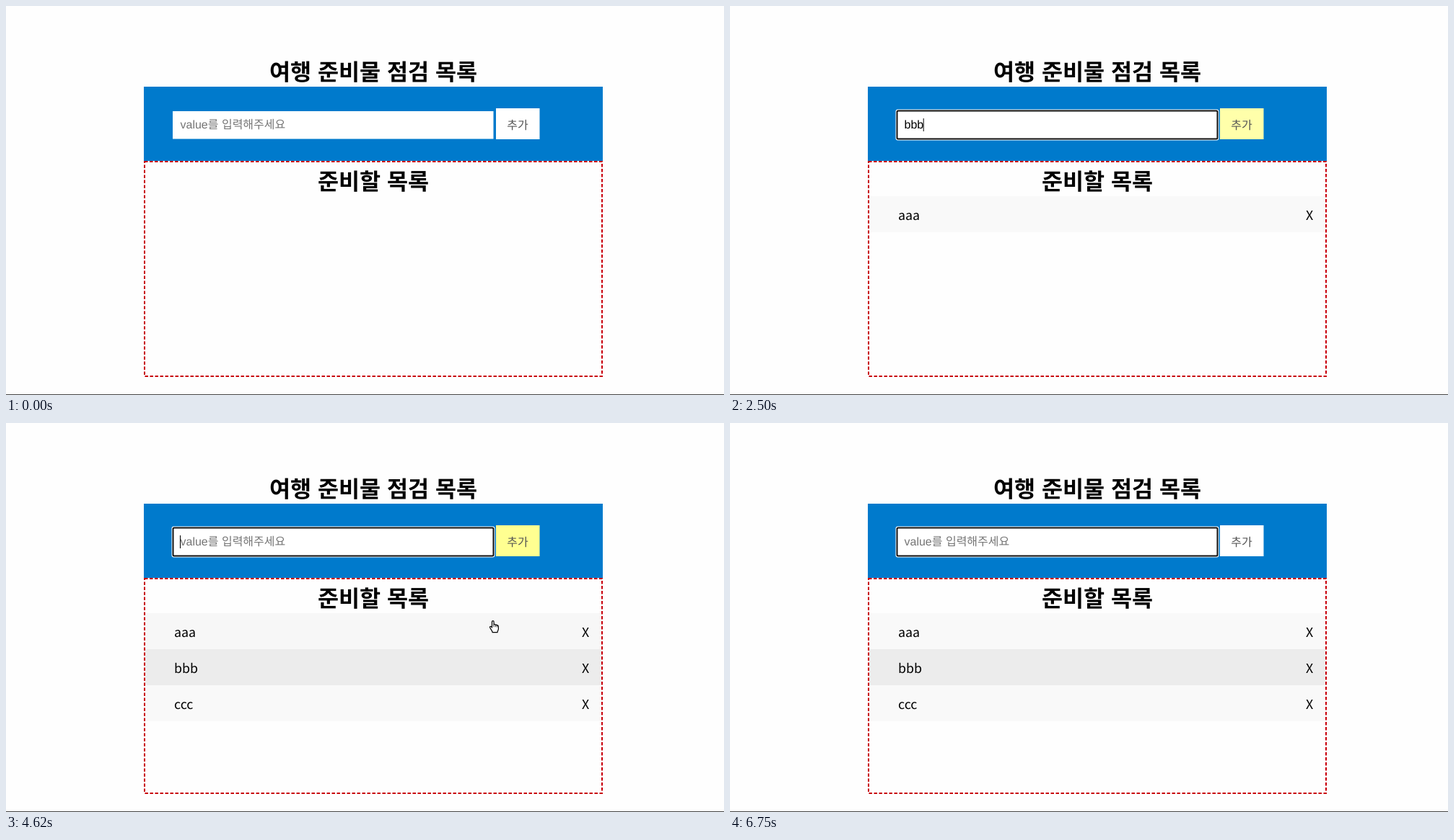
Recreate the animation shown at these times as an HTML page. Size 995 by 540 pixels, loop 6.97 s.

```html
<!DOCTYPE html>
<html lang="ko">
<head>
<meta charset="utf-8">
<title>여행 준비물 점검 목록</title>
<style>
  html, body { margin: 0; width: 100%; height: 100%; overflow: hidden; background: #fefefe; }
  svg { display: block; width: 995px; height: 540px; }
  text { font-family: "Noto Sans CJK KR", "Noto Sans CJK", "Noto Sans", sans-serif; white-space: pre; text-rendering: geometricPrecision; }
  .title { font-size: 31.6px; font-weight: 700; text-anchor: middle; }
  .row text { font-size: 17.8px; }
  .field { font-family: "Liberation Sans", "Noto Sans CJK KR", "Noto Sans CJK", sans-serif; font-size: 16px; }
  #hint { fill: #757575; }
  .btn { font-size: 16px; fill: #555; }
  .pointer { fill: #fff; stroke: #000; stroke-width: 1.2; stroke-linejoin: round; }
</style>
</head>
<body>
<svg viewBox="0 0 995 540" lang="ko">
  <rect y="539" width="995" height="1" fill="#444"/>
  <text class="title" x="509" y="102.6">여행 준비물 점검 목록</text>

  <rect x="191" y="112" width="636" height="103" fill="#007acc"/>
  <rect x="231" y="146" width="444.5" height="38.5" fill="#fff"/>
  <g id="ring">
    <rect x="229.5" y="143.5" width="448" height="43" rx="3" fill="#fff"/>
    <rect x="231.5" y="145.5" width="444" height="39" rx="1.5" fill="#fff" stroke="#101010" stroke-width="2"/>
  </g>
  <text id="hint" class="field" x="241.5" y="170">value를 입력해주세요</text>
  <text id="typed" class="field" x="241.5" y="170"></text>
  <rect id="caret" y="156" width="1" height="18"/>
  <rect id="button" x="679" y="142" width="60.5" height="43"/>
  <text class="btn" x="694.3" y="170.5">추가</text>

  <text class="title" x="509" y="254.6">준비할 목록</text>
  <g id="list"></g>
  <rect x="192" y="216" width="634" height="298" fill="none" stroke="#c8000a" stroke-width="2" stroke-dasharray="4.5 2.5"/>

  <g id="hand" class="pointer">
    <path d="M-1.3 8.5V1.2C-1.3-.4 1.3-.4 1.3 1.2V5.2C2.2 4.4 3.6 4.8 3.7 5.9C4.4 5.1 5.7 5.4 5.8 6.4C6.6 6 7.6 6.4 7.6 7.6V11C7.6 13 6.4 13.6 6.2 16H-.6C-.8 13.6-3.6 11.4-4.2 8.9C-4.3 7.4-2.6 7.2-1.3 9.2Z"/>
    <path d="M1.3 5.3V8.5M3.7 5.9V8.5M5.8 6.4V8.8" stroke-width=".8"/>
  </g>
  <path id="beam" d="M-4-5.5H4M0-5.5V5.5M-4 5.5H4" fill="none" stroke="#000" stroke-width="2"/>
  <path id="arrow" class="pointer" d="M0 0V14L3.3 11L5.5 16L7.8 15L5.6 10.2H10Z"/>
</svg>
<script>
const LOOP = 6970, BLINK = 530;
const $ = id => document.getElementById(id);
const names = ['aaa', 'bbb', 'ccc'];

// time, field text, focused, items in the list
const states = [
  [0, '', false, 0], [900, '', true, 0],
  [1100, 'a', true, 0], [1200, 'aa', true, 0], [1300, 'aaa', true, 0],
  [1690, 'aaa', false, 0], [1780, '', true, 1],
  [2300, 'b', true, 1], [2400, 'bb', true, 1], [2500, 'bbb', true, 1],
  [2900, 'bbb', false, 1], [2980, '', true, 2],
  [3200, 'c', true, 2], [3300, 'cc', true, 2], [3400, 'ccc', true, 2],
  [3700, 'ccc', false, 2], [4100, '', true, 3]
];

// pointer tip: time, x, y
const path = [
  [100, 600, 330], [340, 560, 250], [500, 560, 250], [700, 540, 180.5],
  [1480, 540, 180.5], [1612, 722, 169], [2820, 722, 169], [2960, 712, 164],
  [4400, 712, 164], [4550, 690, 225], [4900, 615, 470], [5150, 605, 470],
  [5255, 602, 452], [5320, 592, 367], [5700, 585, 290], [6220, 620, 480]
];
// the pointer is hidden while typing
const shown = [[100, 1100], [1480, 2300], [2820, 3200], [3560, 6220]];

const rows = names.map((name, i) => {
  const y = 264 + i * 50;
  $('list').insertAdjacentHTML('beforeend',
    `<g class="row"><rect x="193" y="${y}" width="632" height="50"/>` +
    `<text x="233" y="${y + 32.7}">${name}</text><text x="798" y="${y + 32.7}">X</text></g>`);
  const el = $('list').lastChild;
  return { el, bg: el.firstChild, base: i % 2 ? 0xec : 0xf9 };
});

const stateAt = t => states.findLast(s => s[0] <= t) || states[0];

function pointerAt(t) {
  if (!shown.some(([a, b]) => t >= a && t < b)) return null;
  const i = path.findLastIndex(p => p[0] <= t);
  const a = path[i], b = path[i + 1] || a;
  const k = b === a ? 0 : (t - a[0]) / (b[0] - a[0]);
  return [a[1] + (b[1] - a[1]) * k, a[2] + (b[2] - a[2]) * k];
}

// 'button', 'field', a row index, or ''
function zoneAt(t) {
  const p = pointerAt(t);
  if (!p) return '';
  const [x, y] = p;
  if (x >= 679 && x < 739 && y >= 142 && y < 185) return 'button';
  if (x >= 231 && x < 676 && y >= 146 && y < 185) return 'field';
  const row = Math.floor((y - 264) / 50);
  return row >= 0 && row < stateAt(t)[3] && x > 193 && x < 825 ? row : '';
}

// a linear transition is the share of the last `span` ms spent inside
function hover(t, zone, span) {
  const n = 30;
  let sum = 0;
  for (let i = 0; i < n; i++) sum += zoneAt(t - (i + .5) * span / n) === zone;
  return sum / n;
}

const show = (el, on) => el.setAttribute('visibility', on ? 'visible' : 'hidden');

function draw(t) {
  const [start, text, focus, count] = stateAt(t);
  show($('ring'), focus);
  show($('hint'), !text);
  $('typed').textContent = text;
  show($('caret'), focus && Math.floor((t - start) / BLINK) % 2 === 0);
  $('caret').setAttribute('x', 241 + text.length * (text[0] === 'c' ? 8 : 8.9));

  const blue = Math.round(255 * (1 - hover(t, 'button', 300)));
  $('button').setAttribute('fill', `rgb(255,255,${blue})`);

  rows.forEach((r, i) => {
    show(r.el, i < count);
    const v = Math.round(r.base + (0xdd - r.base) * hover(t, i, 200));
    r.bg.setAttribute('fill', `rgb(${v},${v},${v})`);
  });

  const p = pointerAt(t), zone = zoneAt(t);
  const kind = zone === 'field' ? 'beam' : zone === '' ? 'arrow' : 'hand';
  for (const id of ['hand', 'beam', 'arrow']) {
    show($(id), p && id === kind);
    if (p) $(id).setAttribute('transform', `translate(${p[0]} ${p[1]})`);
  }
}

const begin = performance.now();
function tick() {
  draw((performance.now() - begin) % LOOP);
  requestAnimationFrame(tick);
}
tick();
</script>
</body>
</html>
```
